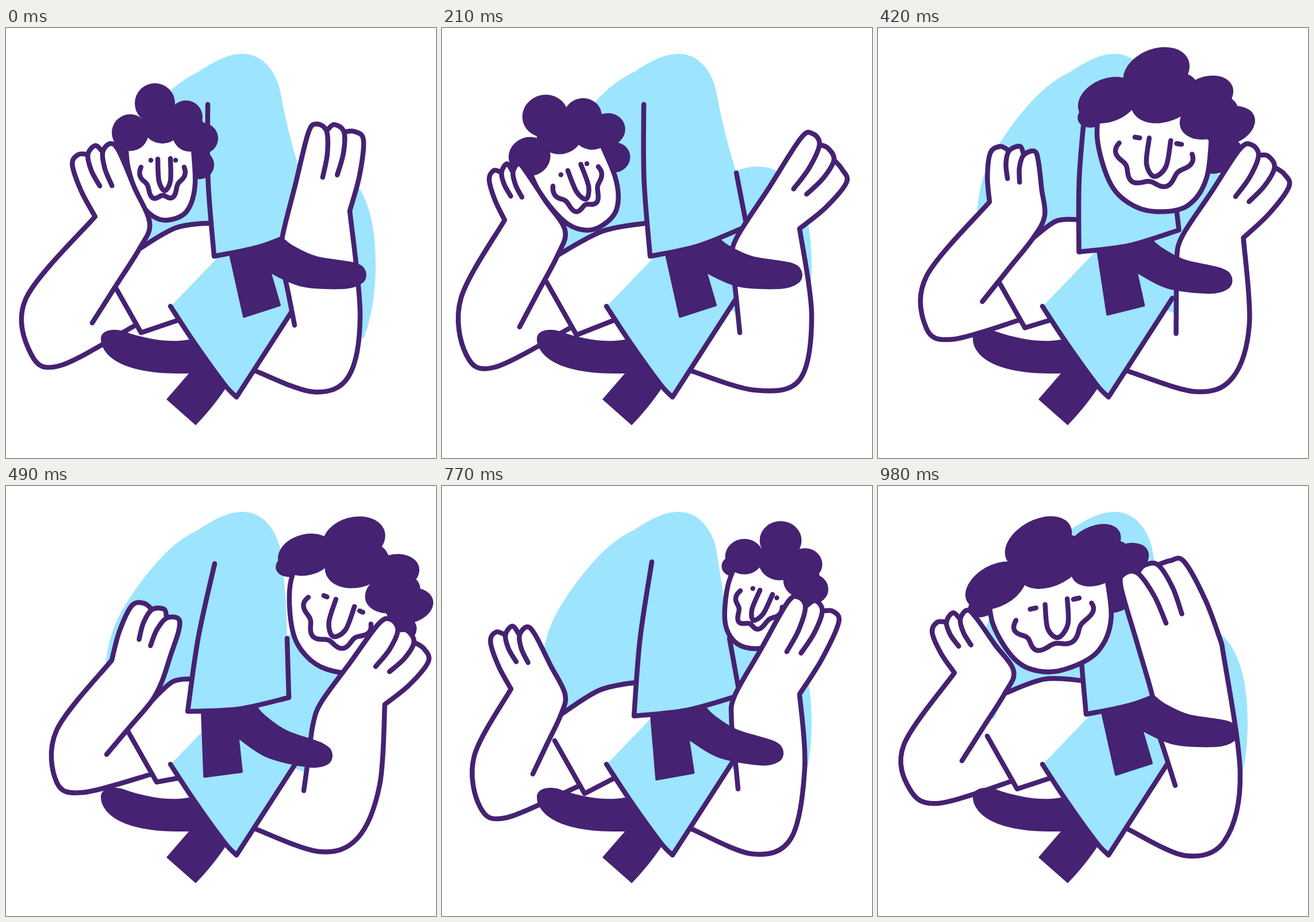
Write an HTML page with a canvas that moves like this. It is 748x748 px and loops after 1050 ms.

```html
<!DOCTYPE html>
<html lang="en">
<head>
<meta charset="utf-8">
<title>Resting head</title>
<style>
html, body { margin: 0; height: 100%; overflow: hidden; background: #fff; }
canvas { display: block; }
</style>
</head>
<body>
<canvas id="stage" width="748" height="748"></canvas>
<script>
const ctx = document.getElementById('stage').getContext('2d');
const INK = '#452272', SKY = '#9de4ff', WHITE = '#fff';
const LOOP = 1050, STEP = 70;

// Key points of each pose:
// left, right: inner tip, palm, first and last fingertip, wrist, three round the elbow
// panel: top left, bottom left, bottom right, top right;  cuff: lower corner
// belt: x, y, angle;  head: origin, x axis, y axis, lean of the curls
const poses = [];
const pose = (at, keys) => poses.push({ at, keys });

const rest = {
  belt: [390,394, 0],
  panel: [351,133, 362,397, 530,345, 512,252]
};
const propped = { right: [515,527, 509,365, 619,193, 680,218, 622,362, 631,490, 607,613, 540,640] };

pose(0, {
  ...rest, cuff: [235,530],
  left: [150,513, 250,340, 182,201, 126,220, 155,328, 35,470, 44,568, 95,587],
  right: [502,517, 481,362, 540,167, 606,180, 598,318, 616,500, 596,606, 535,633],
  head: [275,230, 1,0, 0,1, 0]
});
pose(210, {
  ...rest, cuff: [234,534],
  left: [135,520, 214,352, 133,236, 90,248, 109,334, 33,470, 42,568, 92,590],
  right: [518,530, 511,368, 645,184, 696,246, 622,349, 643,500, 622,612, 545,630],
  head: [231,245, 1.05,-.45, .35,1, -.2]
});
pose(350, {
  belt: [424,383, -.045], cuff: [249,528],
  panel: [358,135, 383,387, 555,335, 535,247],
  left: [188,485, 308,315, 245,198, 186,208, 204,302, 80,440, 80,529, 125,550],
  right: [519,533, 509,350, 630,174, 686,225, 612,350, 642,510, 622,604, 560,629],
  head: [391,187, 1.93,-.1, -.03,1.28, -.5]
});
pose(490, {
  belt: [341,395, .18], cuff: [262,515],
  panel: [363,135, 316,392, 492,368, 489,265],
  left: [175,467, 272,338, 300,231, 240,204, 184,303, 88,425, 88,515, 135,533],
  right: [518,530, 549,375, 669,232, 727,283, 659,380, 650,520, 612,612, 545,636],
  head: [589,206, 1.45,.62, -.4,1.04, -.25]
});
pose(630, {
  ...propped, belt: [287,380, .32], cuff: [251,530],
  panel: [373,132, 271,376, 463,360, 474,277],
  left: [160,492, 217,345, 165,227, 108,247, 111,345, 62,460, 68,543, 125,567],
  head: [565,192, .97,.48, -.42,.84, 0]
});
pose(770, {
  ...propped, belt: [364,400, .135], cuff: [248,535],
  panel: [365,132, 334,400, 518,364, 500,265],
  left: [158,501, 214,362, 148,245, 94,254, 120,353, 56,470, 66,558, 112,577],
  head: [563,187, .97,.38, -.42,.87, 0]
});
pose(980, {
  ...rest, cuff: [242,527],
  left: [146,478, 236,322, 155,216, 103,237, 133,325, 45,450, 55,527, 105,552],
  right: [517,521, 478,368, 428,153, 508,130, 598,275, 630,500, 603,617, 535,643],
  head: [310,204, 1.75,-.4, .03,1.13, -.5]
});

const lowerBelt = new Path2D('M165,541C165,527 183,522 203,527C245,542 285,548 318,542L329,549L382,627C365,652 350,670 330,691L279,646L318,601C265,602 215,597 185,575C172,565 165,553 165,541Z');
const torso = new Path2D('M455,300C475,265 510,241 550,241C607,241 643,300 643,410C643,460 636,505 622,540L500,490L401,642L286,484L380,387Z');

const add = (a, b, k = 1) => [a[0] + b[0] * k, a[1] + b[1] * k];
const sub = (a, b) => add(a, b, -1);
const mix = (a, b, u) => a.map((v, i) => v + (b[i] - v) * u);
const dot = (a, b) => a[0] * b[0] + a[1] * b[1];
const unit = a => a.map(v => v / Math.hypot(...a));
const pairs = list => list.flatMap((v, i) => i % 2 ? [] : [[v, list[i + 1]]]);

function poseAt(t) {
  const i = poses.findLastIndex(p => p.at <= t);
  const a = poses[i], b = poses[(i + 1) % poses.length];
  let u = (t - a.at) / ((b.at || LOOP) - a.at);
  if (a.at === 210 || a.at === 770) u **= 1.6; // slow start before each swing
  const now = {};
  for (const k in a.keys) now[k] = mix(a.keys[k], b.keys[k], u);
  return now;
}

// Smooth curve through all points.
function trace(path, pts, join) {
  const at = i => pts[Math.max(0, Math.min(pts.length - 1, i))];
  path[join ? 'lineTo' : 'moveTo'](...pts[0]);
  for (let i = 0; i < pts.length - 1; i++) {
    const out = add(at(i), sub(at(i + 1), at(i - 1)), 1 / 6);
    const into = add(at(i + 1), sub(at(i + 2), at(i)), -1 / 6);
    path.bezierCurveTo(...out, ...into, ...at(i + 1));
  }
}

function fill(color, ...chains) {
  const path = new Path2D();
  chains.forEach((c, i) => trace(path, c, i > 0));
  ctx.fillStyle = color;
  ctx.fill(path);
}

function line(...chains) {
  const path = new Path2D();
  chains.forEach(c => trace(path, c));
  ctx.stroke(path);
}

function shape(color, ...chains) {
  fill(color, ...chains);
  line(...chains);
}

// Where the forearm bends into the hand.
const bendOf = ([tip, palm, , , wrist]) => add(mix(palm, tip, .25), unit(sub(palm, wrist)), 7);

function arm(keys, end) {
  const [tip, palm, first, last, wrist, ...elbow] = keys;
  const gap = sub(last, first).map(v => v / 2);
  const middle = add(mix(first, last, .5), unit(sub(first, wrist)), 6);
  const fingers = [first, middle, last].map((top, i) => {
    const base = mix(wrist, palm, [.33, .15, 0][i]);
    const down = unit(sub(base, top));
    const side = add(gap, down, -dot(gap, down));
    const knuckle = s => add(add(top, side, s), down, 14);
    const near = knuckle(-.5), far = knuckle(.5);
    const stop = i < 2 ? mix(top, base, .56) : wrist;
    return { near, far, curve: [top, far, add(mix(far, stop, .5), side, .15), stop] };
  });
  const [a, b, c] = fingers, bend = bendOf(keys);
  shape(WHITE,
    [tip, mix(tip, bend, .5), bend, palm, mix(palm, a.near, .5), a.near, ...a.curve],
    [a.far, ...b.curve],
    [b.far, ...c.curve],
    [wrist, ...elbow, end]);
}

function body(panel, cuff, bend) {
  const [tl, bl, br, tr] = panel;
  ctx.fillStyle = SKY;
  ctx.fill(new Path2D(`M172,330C176,250 200,215 236,165C275,115 300,93 335,76C370,53 390,45 412,45C445,45 467,72 476,105Q488,175 ${tr}L480,400L185,405Z`));
  ctx.fill(torso);

  const hip = mix(bl, tl, .22), hem = [300, 508], armpit = add(cuff, [-52, -92]);
  const thigh = [bend, add(mix(bend, hip, .5), [0, -14]), hip];
  fill(WHITE, thigh, [[380, 387], [288, 483]], [hem], [cuff], [armpit]);
  line(thigh, [armpit, cuff], [cuff, hem]);
  line([[286, 484], [328, 548], [380, 620], [401, 642]], [[401, 642], [512, 470]]);
  shape(SKY, [tl, add(mix(tl, bl, .5), [-5, 0]), bl], [bl, add(mix(bl, br, .5), [0, 8]), br], [br, tr]);
}

function head([ox, oy, xx, xy, yx, yy, lean]) {
  const place = ([x, y]) => [ox + xx * x + yx * y, oy + xy * x + yy * y];
  const wide = Math.hypot(xx, xy), tall = Math.hypot(yx, yy);
  const curl = (x, y, r) => {
    ctx.beginPath();
    ctx.ellipse(...place([x, y]), r * wide, r * tall, lean, 0, 7);
    ctx.fillStyle = INK;
    ctx.fill();
  };
  curl(-70, -24, 18);
  curl(62, 8, 25);
  shape(WHITE, pairs([-67,-50, -63,10, -43,70, -20,97, 8,104, 40,88, 54,40, 48,-50]).map(place));
  curl(-59, -48, 32);
  curl(-16, -99, 35);
  curl(38, -75, 29);
  curl(67, -38, 27);
  curl(-3, -65, 36);
  curl(45, -46, 31);

  const mouth = Array.from({ length: 41 }, (_, i) => {
    const u = i / 40, r = 1 + .09 * Math.cos(2 * Math.PI * (u - .07) / .29);
    return place([-3 - 37 * r * Math.cos(Math.PI * u), 12 + 54 * r * Math.sin(Math.PI * u)]);
  });
  const blink = 4.5 * Math.max(0, wide - 1.15);
  const eye = x => [[x - blink, 0], [x + blink, 0]].map(place);
  line(pairs([-11,-2, -9,36, 1,53, 11,36, 11,-3]).map(place), mouth, eye(-23), eye(20));
}

function belt([x, y, angle]) {
  const cos = Math.cos(angle), sin = Math.sin(angle);
  const turn = ([a, b]) => [x + a * cos - b * sin, y + a * sin + b * cos];
  const [a, b, c, ...tail] = pairs([0,0, 24,108, 86,88, 69,30, 125,54, 198,58, 229,48, 234,30, 216,16, 150,5, 108,-14, 90,-28]).map(turn);
  shape(INK, [a, b], [b, c], [c, tail[0]], tail);
}

function draw(now) {
  const p = poseAt(Math.floor(now % LOOP / STEP) * STEP);
  const left = pairs(p.left), right = pairs(p.right);
  ctx.fillStyle = WHITE;
  ctx.fillRect(0, 0, 748, 748);
  ctx.strokeStyle = INK;
  ctx.lineWidth = 8.5;
  ctx.lineCap = ctx.lineJoin = 'round';
  body(pairs(p.panel), p.cuff, bendOf(left));
  head(p.head);
  arm(left, add(p.cuff, [-8, -14]));
  arm(right, [435, 597]);
  ctx.lineWidth = 4;
  belt(p.belt);
  ctx.fill(lowerBelt);
  requestAnimationFrame(draw);
}
requestAnimationFrame(draw);
</script>
</body>
</html>
```
